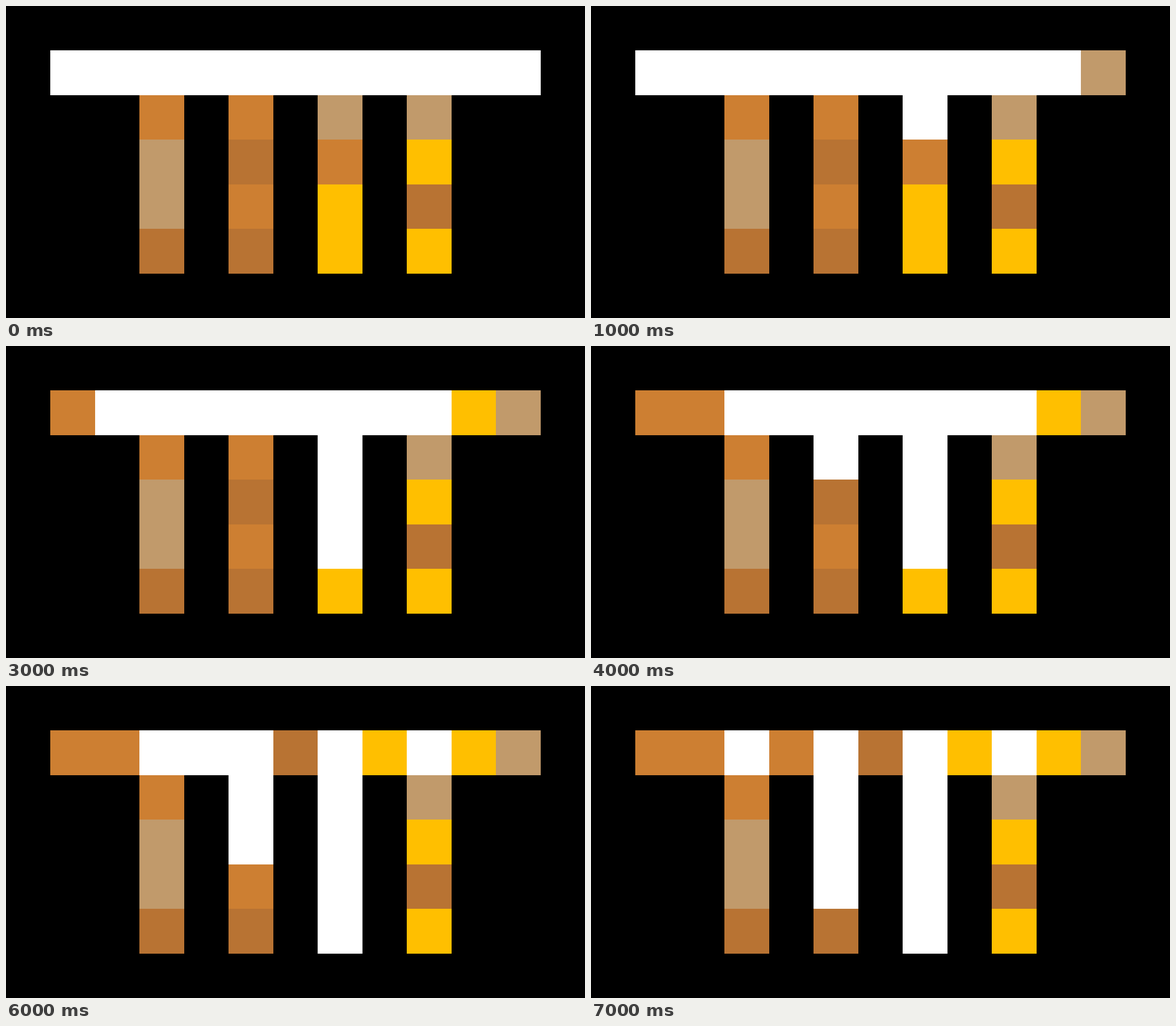
Write an HTML page with a canvas that moves like this. It is 1020 px wide and 549 px high and loops after 8 s.

```html
<!DOCTYPE html>
<html lang="en">
<head>
<meta charset="utf-8">
<title>Sorting blocks</title>
<style>
html, body { margin: 0; width: 100%; height: 100%; overflow: hidden; background: #000; }
canvas { display: block; }
</style>
</head>
<body>
<canvas width="1020" height="549"></canvas>
<script>
const ctx = document.querySelector('canvas').getContext('2d');
const colors = { A: '#ffbf00', B: '#cd7f32', C: '#b87333', D: '#c19a6b', '.': '#fff' };
const start = [
  '             ',
  ' ........... ',
  '   B B D D   ',
  '   D C B A   ',
  '   D B A C   ',
  '   C C A A   '
];
// One move per second: column, row, target column in the hallway
const moves = [[7, 2, 11], [7, 3, 1], [7, 4, 10], [5, 2, 2], [5, 3, 6], [7, 5, 8], [5, 4, 4]];
const LOOP = 8000;
const edge = i => Math.round(i * 1020 / 13);
let shown = -1;

function draw(step) {
  const grid = start.map(row => [...row]);
  for (const [x, y, to] of moves.slice(0, step)) {
    grid[1][to] = grid[y][x];
    grid[y][x] = '.';
  }
  ctx.fillStyle = '#000';
  ctx.fillRect(0, 0, 1020, 549);
  grid.forEach((row, y) => row.forEach((cell, x) => {
    if (cell === ' ') return;
    ctx.fillStyle = colors[cell];
    ctx.fillRect(edge(x), edge(y), edge(x + 1) - edge(x), edge(y + 1) - edge(y));
  }));
}

function tick() {
  const step = Math.floor(performance.now() % LOOP / 1000);
  if (step !== shown) draw(shown = step);
  requestAnimationFrame(tick);
}
tick();
</script>
</body>
</html>
```
